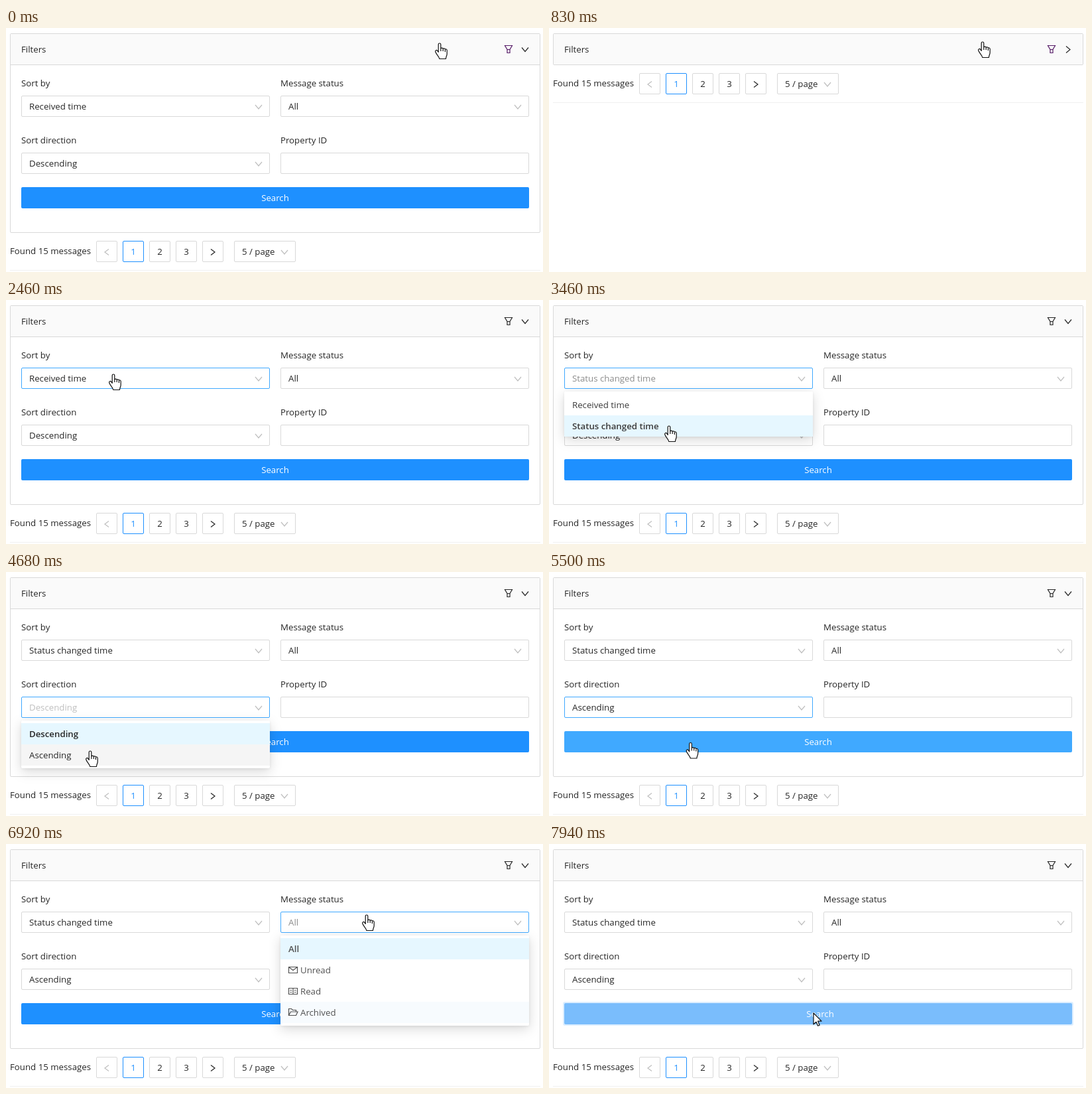
These frames come from a looping animation (810 by 368 pixels, 8000 ms). An HTML page:

```html
<!DOCTYPE html>
<html lang="en">
<head>
<meta charset="utf-8">
<title>Message filters</title>
<style>
html, body { margin: 0; width: 100%; height: 100%; overflow: hidden; background: #fff; }
svg { display: block; font: 13.25px "Open Sans", "Noto Sans", sans-serif; }
.menu { filter: drop-shadow(0 1px 2px rgba(0,0,0,.08)) drop-shadow(0 5px 9px rgba(0,0,0,.15)); }
</style>
</head>
<body>
<svg id="stage" width="810" height="368" viewBox="0 0 810 368"></svg>
<script>
const LOOP = 8000, STEP = 203.6, FULL = 253;
const INK = '#262626', LINE = '#d9d9d9', BLUE = '#1e90ff', FOCUS = '#40a9ff';
const HAND = 'M-1.8 1.8C-1.8-.6 1.8-.6 1.8 1.8V8c.6-1.4 3.2-1.2 3.4.4.8-1 3-.8 3.2.8.9-.8 2.8-.4 2.8 1.6V16' +
  'c0 3-1.6 4-1.8 7.5H-.2C-.6 20-4.8 17-6.2 13c-.8-2.2 1.6-3.4 3-1.6l1.4 2zM1.8 8v4M5.2 9v3M8.4 10v3';
const ARROW = 'M0 0V17l4-3.7 2.6 6 2.6-1.1-2.6-6h5.4z';

// Pointer waypoints: step, x, y
const POINTER = [
  [0, 654, 23], [3, 654, 23], [4, 654, 21], [8, 654, 21], [9, 560, 45], [10, 340, 85], [12, 162, 112],
  [14, 162, 114], [16, 181, 190], [18, 181, 190], [19, 150, 196], [20, 138, 200], [21, 135, 214],
  [23, 127, 270], [26, 127, 270], [28, 300, 245], [29, 430, 205], [30, 543, 112], [31, 543, 112],
  [32, 541, 165], [33, 543, 240], [34, 544, 107], [35, 544, 107], [37, 450, 210], [38, 400, 255], [39, 399, 255]
];
const ICONS = {
  Unread: 'M426.5 185.5h13v9h-13zl6.5 5 6.5-5',
  Read: 'M426.5 217.5h13v9h-13zM433 217.5v9M428.5 220.5h2.5M428.5 223.5h2.5M435 220.5h2.5M435 223.5h2.5',
  Archived: 'M426.5 258.5v-10h4l2 2h5v2.5M426.5 258.5l3-5.5h10.5l-2.5 5.5z'
};

const within = (n, from, to) => n >= from && n <= to;
const text = (x, y, str, color = INK, extra = '') =>
  `<text x="${x}" y="${y}" fill="${color}" ${extra}>${str}</text>`;
const fill = (x, y, w, h, color, extra = '') =>
  `<rect x="${x}" y="${y}" width="${w}" height="${h}" fill="${color}" ${extra}/>`;
const box = (x, y, w, h, stroke = LINE, color = '#fff') =>
  fill(x + .5, y + .5, w - 1, h - 1, color, `rx="1.5" stroke="${stroke}"`);
const path = (d, color, width = 1.2, extra = '') =>
  `<path d="${d}" fill="none" stroke="${color}" stroke-width="${width}" ${extra}/>`;
const chevron = (x, y, color, turn = 0, size = 5) =>
  path(`M${-size}-3L0 3 ${size}-3`, color, 1.2, `transform="translate(${x} ${y}) rotate(${turn})"`);

function select(x, y, value, focused, color) {
  return box(x, y, 375, 32, focused ? FOCUS : LINE) + text(x + 12, y + 21, value, color) +
    chevron(x + 358, y + 17, '#bfbfbf');
}

function menu(x, y, items, chosen, hovered, { ink = INK, hover = '#f5f5f5', pad = 4 } = {}) {
  const rows = items.map((item, i) => {
    const top = y + 4 + i * 32, icon = ICONS[item];
    const back = i === chosen ? '#e6f7ff' : i === hovered ? hover : '#fff';
    return fill(x, top, 375, 32, back) + (icon ? path(icon, ink) : '') +
      text(x + (icon ? 30 : 12), top + 21, item, ink, i === chosen ? 'font-weight="600"' : '');
  });
  return fill(x, y, 375, items.length * 32 + 4 + pad, '#fff', 'rx="2" class="menu"') + rows.join('');
}

function pointer(n) {
  const next = POINTER.findIndex(p => p[0] >= n);
  const [n1, x1, y1] = POINTER[next], [n0, x0, y0] = POINTER[Math.max(0, next - 1)];
  const k = n1 === n0 ? 0 : (n - n0) / (n1 - n0);
  const arrow = n === 9 || n === 10 || n === 29 || n === 36 || n === 37 || n === 39;
  return `<path d="${arrow ? ARROW : HAND}" fill="#fff" stroke="#111" stroke-width="1.2" stroke-linejoin="round"
    transform="translate(${x0 + (x1 - x0) * k} ${y0 + (y1 - y0) * k})"/>`;
}

function searchButton(n) {
  const loading = n === 39, hovered = within(n, 25, 28) || n === 38;
  const color = loading ? '#7abdfc' : hovered ? FOCUS : BLUE;
  return (loading ? fill(21, 238, 770, 36, '#dceeff', 'rx="3"') : '') +
    fill(23, 240, 766, 32, color, 'rx="2"') +
    text(loading ? 409 : 406, 261, 'Search', '#fff', 'text-anchor="middle"');
}

function form(n) {
  const sortBy = n < 17 ? 'Received time' : 'Status changed time';
  const sortInk = within(n, 13, 16) ? '#bfbfbf' : n === 17 ? '#8c8c8c' : INK;
  const dirInk = within(n, 20, 23) ? '#bfbfbf' : n === 24 ? '#8c8c8c' : INK;
  const statusInk = within(n, 31, 33) ? '#bfbfbf' : n === 34 ? '#8c8c8c' : INK;
  return text(23, 88, 'Sort by') + text(414, 88, 'Message status') +
    text(23, 174, 'Sort direction') + text(414, 174, 'Property ID') +
    select(23, 102, sortBy, within(n, 12, 19), sortInk) +
    select(414, 102, 'All', within(n, 31, 38), statusInk) +
    select(23, 188, n < 24 ? 'Descending' : 'Ascending', within(n, 20, 30), dirInk) +
    box(414, 188, 375, 32) + searchButton(n);
}

function openMenu(n) {
  if (within(n, 13, 17))
    return menu(23, 138, ['Received time', 'Status changed time'], n < 17 ? 0 : 1, n > 15 ? 1 : 0,
      n === 17 ? { ink: '#3a3a3a', pad: 0 } : {});
  if (within(n, 20, 24))
    return menu(23, 224, ['Descending', 'Ascending'], n < 24 ? 0 : 1, n > 22 ? 1 : 0);
  if (within(n, 31, 34))
    return menu(414, 138, ['All', 'Unread', 'Read', 'Archived'], 0, n === 32 ? 1 : n > 32 ? 3 : 0,
      n === 34 ? { ink: '#505050', hover: '#f7fbfe' } : {});
  return '';
}

function pagination() {
  const pages = [1, 2, 3].map(p => box(136 + p * 40, 321, 32, 32, p === 1 ? BLUE : LINE) +
    text(152 + p * 40, 342, p, p === 1 ? BLUE : INK, 'text-anchor="middle"'));
  return text(6, 341, 'Found 15 messages') + box(136, 321, 32, 32) + chevron(152, 338, '#bfbfbf', 90, 4.5) +
    pages.join('') + box(296, 321, 32, 32) + chevron(312, 338, INK, -90, 4.5) +
    box(344, 321, 93, 32) + text(356, 342, '5 / page') + chevron(420, 338, '#bfbfbf') +
    fill(6, 365, 800, 1, '#f0f0f0');
}

function scene(n) {
  const open = n === 1 || n === 6 ? .5 : within(n, 2, 5) ? 0 : 1;
  const shift = Math.round(FULL * (1 - open));
  const funnel = n < 6 ? '#551a66' : INK;
  return `<clipPath id="body"><rect y="56" width="810" height="${FULL - 1 - shift}"/></clipPath>` +
    box(6, 8, 800, 301 - shift) + fill(7, 9, 798, 46, '#fafafa') + fill(7, 55, 798, 1, LINE) +
    text(23, 37, 'Filters') +
    path('M752.5 26.5h11l-3.5 6v5h-4v-5zM756 32.5h4', funnel) +
    chevron(783, 32.5, INK, -90 * (1 - open)) +
    `<g clip-path="url(#body)">${form(n)}</g>` +
    `<g transform="translate(0 ${-shift})">${pagination()}</g>` +
    openMenu(n) + pointer(n);
}

const stage = document.getElementById('stage');
let shown = -1;
function tick() {
  const n = Math.min(39, Math.floor((performance.now() % LOOP + 12) / STEP));
  if (n !== shown) stage.innerHTML = scene(shown = n);
  requestAnimationFrame(tick);
}
tick();
</script>
</body>
</html>
```
